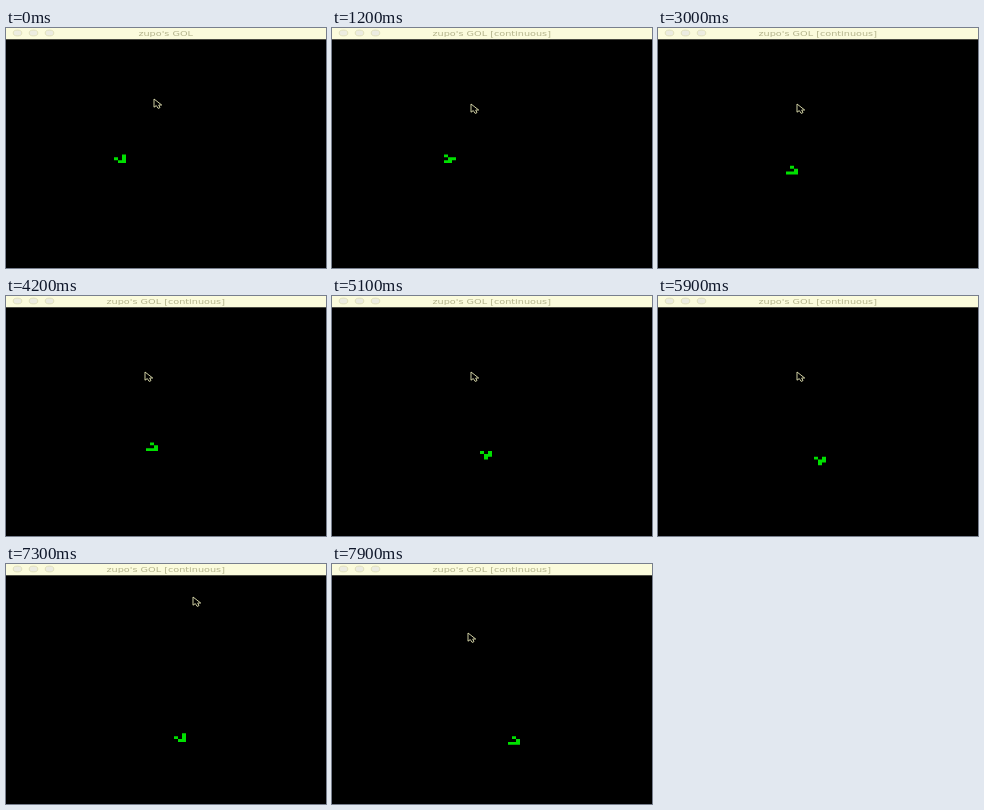
These frames come from a looping animation (320x240 px, 8 s). An HTML page:

```html
<!DOCTYPE html>
<html lang="en">
<head>
<meta charset="utf-8">
<title>Game of Life</title>
<style>
  html, body { margin: 0; width: 100%; height: 100%; overflow: hidden; background: #000; }
  svg { display: block; width: 100vw; height: 100vh; }
  text { font: 9.7px "DejaVu Sans", sans-serif; text-anchor: middle; fill: #b4b48c; }
</style>
</head>
<body>
<svg viewBox="0 0 320 240">
  <rect width="320" height="240"/>
  <rect width="320" height="11.3" fill="#fbfbdc"/>
  <g fill="#ecece0" stroke="#dcdcb4" stroke-width=".8">
    <ellipse cx="11.5" cy="5" rx="4.3" ry="2.9"/>
    <ellipse cx="27.5" cy="5" rx="4.3" ry="2.9"/>
    <ellipse cx="43.5" cy="5" rx="4.3" ry="2.9"/>
  </g>
  <!-- The window is slightly flattened, its lettering included. -->
  <text id="title" transform="translate(159.7 7.9) scale(1 .8)"></text>
  <path id="glider" fill="#00e000"/>
  <path id="cursor" d="M1 1V9.2L3.3 7.6L5.2 10.4L7 9.6L5.7 7H8.7Z"
        fill="#000" stroke="#e4e4b4" stroke-width=".9"/>
</svg>
<script>
const LOOP = 8000, STEP = 100;
const START = 1100;
const PAUSES = [2600, 6200];
const FIRST_GENERATION = 110;
const CELL = { width: 4, height: 229 / 80, top: 46.25 };

// Four glider phases; all but the first sit one row lower, the last also one column right.
const PHASES = [
  { dx: 0, dy: 0, rows: [".X.", "..X", "XXX"] },
  { dx: 0, dy: 1, rows: ["X.X", ".XX", ".X."] },
  { dx: 0, dy: 1, rows: ["..X", "X.X", ".XX"] },
  { dx: 1, dy: 1, rows: ["X..", ".XX", "XX."] }
];

// Cursor keys: time, x, y
const ENTRY_PATH = [[0, 147, 70], [400, 138, 75], [6100, 138, 75], [6400, 212, 4]];
const RETURN_PATH = [[7100, 212, 12], [7500, 160, 52], [7900, 135, 68]];

const title = document.getElementById("title");
const glider = document.getElementById("glider");
const cursor = document.getElementById("cursor");

function generationAt(time) {
  const steps = Math.max(0, (time - START) / STEP);
  return FIRST_GENERATION + steps - PAUSES.filter(pause => time >= pause).length;
}

function gliderPath(generation) {
  const { dx, dy, rows } = PHASES[generation % 4];
  const offset = Math.floor(generation / 4);
  let path = "";
  rows.forEach((cells, r) => [...cells].forEach((cell, c) => {
    if (cell !== "X") return;
    const x = (offset + dx + c) * CELL.width;
    const y = CELL.top + (offset + dy + r) * CELL.height;
    path += `M${x} ${y}h${CELL.width}v${CELL.height}h${-CELL.width}z`;
  }));
  return path;
}

function along(keys, time) {
  const next = keys.findIndex(key => key[0] > time);
  if (next < 0) return keys[keys.length - 1].slice(1);
  const [t0, x0, y0] = keys[next - 1], [t1, x1, y1] = keys[next];
  const k = (time - t0) / (t1 - t0);
  return [x0 + (x1 - x0) * k, y0 + (y1 - y0) * k].map(Math.round);
}

function draw(elapsed) {
  const time = Math.floor(elapsed % LOOP / STEP) * STEP;
  title.textContent = "zupo's GOL" + (time >= START ? " [continuous]" : "");
  glider.setAttribute("d", gliderPath(generationAt(time)));

  const hidden = time > 6400 && time < 7100;
  cursor.setAttribute("visibility", hidden ? "hidden" : "visible");
  if (!hidden) {
    const [x, y] = along(time < 7100 ? ENTRY_PATH : RETURN_PATH, time);
    cursor.setAttribute("transform", `translate(${x} ${y})`);
  }
}

const begin = performance.now();
function tick() {
  draw(performance.now() - begin);
  requestAnimationFrame(tick);
}
tick();
</script>
</body>
</html>
```
